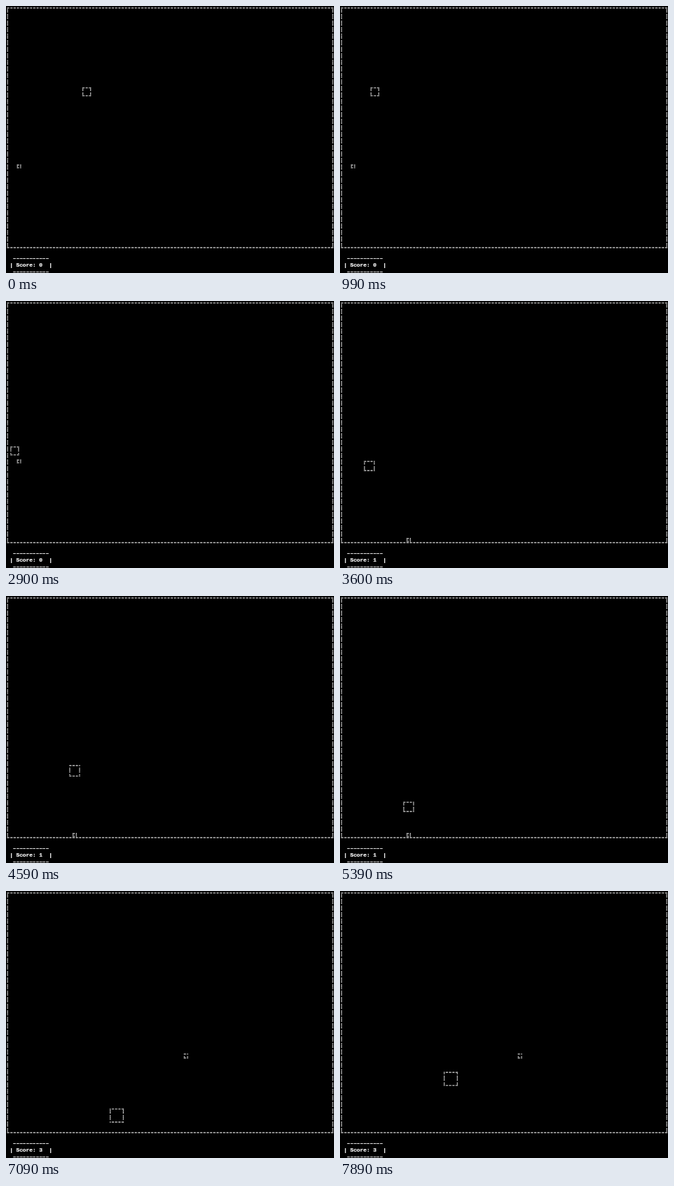
An HTML page for the animation above (7990 ms loop, 468 by 380 pixels).

```html
<!DOCTYPE html>
<html lang="en">
<head>
<meta charset="utf-8">
<title>Terminal box game</title>
<style>
  html, body { margin: 0; width: 100%; height: 100%; overflow: hidden; background: #000; }
  svg { display: block; width: 468px; height: 380px; }
  path { fill: none; stroke: #d8d8d8; stroke-width: 1.65; stroke-linecap: round; }
  text {
    fill: #fff; stroke: #fff; stroke-width: 0.2; white-space: pre;
    font: bold 8px "Liberation Mono", monospace; letter-spacing: -0.13px;
  }
</style>
</head>
<body>
<svg viewBox="0 0 468 380">
  <path id="border"/>
  <path id="food"/>
  <path id="player"/>
  <text id="above" x="9.8" y="361.2"></text>
  <text id="score" x="5.2" y="371.2"></text>
  <text id="below" x="9.8" y="380.2"></text>
</svg>
<script>
const LOOP = 7990, STEP = 100;
const COLS = 200, ROWS = 148;

// Straight runs of the player, in braille dots: dx, dy, steps taken
const START = [46, 49];
const legs = [
  [-44, 0, 15.6], [0, 48, 16.4], [36, 0, 12],
  [0, 43, 15.4], [25, 0, 8.93], [0, -30, 10.2]
];

// Food and score from a given step on
const stages = [
  { from: 0, score: 0, food: [6, 96] },
  { from: 30, score: 1, food: [40, 144] },
  { from: 59, score: 3, food: [108, 99] }
];

const el = id => document.getElementById(id);

// Dots come in 2 x 4 character cells with a gap between cells
const dotX = c => 2.25 + 4.67 * (c >> 1) + 1.7 * (c & 1);
const dotY = r => 2.85 + 9.315 * (r >> 2) + 1.9 * (r & 3);

function outline(left, top, w, h) {
  let d = "";
  for (let r = top; r <= Math.min(top + h, ROWS - 1); r++) {
    const full = r === top || r === top + h;
    for (let c = left; c <= left + w; c += full ? 1 : w) {
      d += `M${dotX(c).toFixed(2)} ${dotY(r).toFixed(2)}h0`;
    }
  }
  return d;
}

function position(step) {
  let [x, y] = START;
  for (const [dx, dy, steps] of legs) {
    const k = Math.max(0, Math.min(1, step / steps));
    x += dx * k;
    y += dy * k;
    step -= steps;
  }
  return [Math.round(x), Math.round(y)];
}

function render(t) {
  const step = Math.floor((t % LOOP + 10) / STEP);
  const { score, food } = stages.filter(s => s.from <= step).pop();
  const size = 5 + score;
  el("player").setAttribute("d", outline(...position(step), size, size));
  el("food").setAttribute("d", outline(...food, 2, 2));
  el("score").textContent = `| Score: ${score}  |`;
}

el("border").setAttribute("d", outline(0, 0, COLS - 1, ROWS - 1));
for (const id of ["above", "below"]) el(id).textContent = "–".repeat(11);

const start = performance.now();
function tick() {
  render(performance.now() - start);
  requestAnimationFrame(tick);
}
tick();
</script>
</body>
</html>
```
